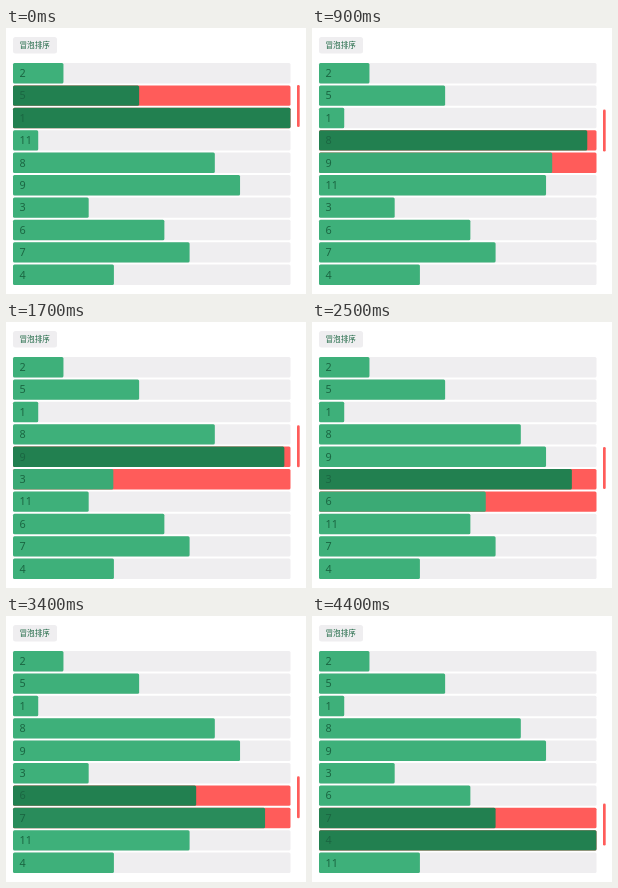
Animation, 300 px wide and 266 px high, one loop 4600 ms. Source, as an HTML page:

```html
<!DOCTYPE html>
<html lang="zh-CN">
<head>
<meta charset="utf-8">
<style>
  html, body { margin: 0; width: 100%; height: 100%; overflow: hidden; background: #fff; }
  svg { display: block; }
  text { fill: #1b6642; font: 10.8px "Noto Sans", sans-serif; }
  .title { font: 500 7.6px "Noto Sans CJK SC", "Noto Sans CJK", sans-serif; }
</style>
</head>
<body>
<svg width="300" height="266" viewBox="0 0 300 266">
  <rect x="7" y="9" width="44" height="16.5" rx="2.5" fill="#efeef0"/>
  <text class="title" x="13.5" y="20">冒泡排序</text>
  <g id="rows"></g>
  <rect id="marker" x="291" width="2.7" height="42" rx="1.3" fill="#ff5c5a"/>
</svg>
<script>
const LOOP = 4600, STEP = 800, START = 66, DURATION = 300;
const LEFT = 7, TOP = 35, PITCH = 22.4, HEIGHT = 20.4, FULL = 277.5, MAX = 11;
const TRACK = '#efeef0', RED = '#ff5c5a', LIGHT = [62, 176, 122], DARK = [34, 128, 80];
const before = [2, 11, 5, 1, 8, 9, 3, 6, 7, 4];
const after = [2, 5, 1, 8, 9, 3, 6, 7, 4, 11];

const group = document.getElementById('rows');
const marker = document.getElementById('marker');
const mix = (a, b, p) => a + (b - a) * p;
const blend = p => `rgb(${LIGHT.map((c, i) => Math.round(mix(c, DARK[i], p)))})`;

function add(tag, attrs) {
  const el = document.createElementNS('http://www.w3.org/2000/svg', tag);
  for (const name in attrs) el.setAttribute(name, attrs[name]);
  return group.appendChild(el);
}

const rows = before.map((_, i) => {
  const y = TOP + i * PITCH;
  const box = { x: LEFT, y, width: FULL, height: HEIGHT, rx: 1.5 };
  return {
    track: add('rect', box),
    bar: add('rect', box),
    label: add('text', { x: 13.5, y: y + 14 })
  };
});

// cubic-bezier(.25, .1, .25, 1)
function ease(x) {
  if (x <= 0 || x >= 1) return x <= 0 ? 0 : 1;
  const curve = (s, a, b) => 3 * a * s * (1 - s) ** 2 + 3 * b * s * s * (1 - s) + s ** 3;
  let low = 0, high = 1;
  for (let i = 0; i < 20; i++) {
    const mid = (low + high) / 2;
    if (curve(mid, .25, .25) < x) low = mid; else high = mid;
  }
  return curve(low, .1, 1);
}

function draw(now) {
  const time = now % LOOP;
  const step = Math.floor((time - START) / STEP);
  const p = step < 0 ? 1 : ease((time - START - step * STEP) / DURATION);
  const active = step + 2;

  rows.forEach(({ track, bar, label }, i) => {
    const passed = i <= active + 1;
    let value = passed ? after[i] : before[i], shade = 0;
    if (i === active) {
      value = mix(MAX, value, p);
      shade = 1;
    } else if (i === active + 1) {
      value = mix(value, MAX, p);
      shade = p;
    }
    track.setAttribute('fill', i === active || i === active + 1 ? RED : TRACK);
    bar.setAttribute('fill', blend(shade));
    bar.setAttribute('width', FULL * value / MAX);
    label.textContent = passed ? after[i] : i === active + 2 ? MAX : before[i];
  });
  marker.setAttribute('y', 35.3 + 21.75 * (active - 1 + p));
  requestAnimationFrame(() => draw(performance.now()));
}
draw(performance.now());
</script>
</body>
</html>
```
